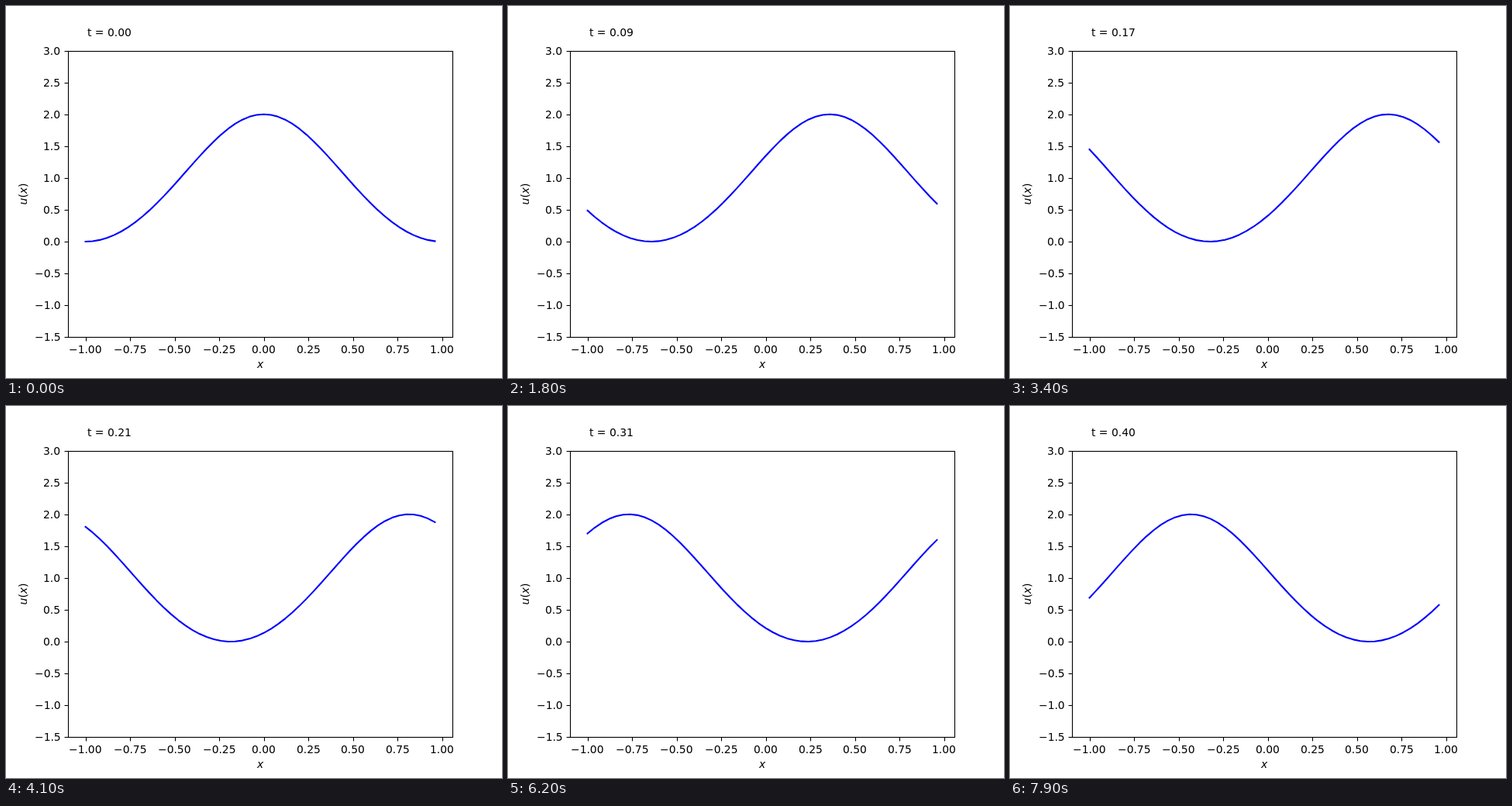
Recreate the animation shown at these times as an HTML page with a canvas. Size 640 by 480 pixels, loop 8000 ms.

```html
<!DOCTYPE html>
<html lang="en">
<head>
<meta charset="utf-8">
<title>Travelling cnoidal wave</title>
<style>
  html, body { margin: 0; width: 100%; height: 100%; overflow: hidden; background: #fff; }
  canvas { display: block; width: 640px; height: 480px; }
</style>
</head>
<body>
<canvas id="stage" width="640" height="480"></canvas>
<script>
const ctx = document.getElementById('stage').getContext('2d');
const FONT = '13.89px "DejaVu Sans", sans-serif';
const OBLIQUE = 'italic ' + FONT;

const LOOP = 8000, STEP = 100;
const DT = 0.00505;      // simulated time per step
const SHIFT = 0.01987;   // crest travel per step
const POINTS = 50, DX = 0.04;
const NOME = 0.0252;

const box = { left: 80, right: 576, top: 57.6, bottom: 427.2 };
const px = x => box.left + (x + 1.098) / 2.156 * (box.right - box.left);
const py = u => box.bottom - (u + 1.5) / 4.5 * (box.bottom - box.top);
const snap = v => Math.floor(v + 0.5) + 0.5;

// Fourier series of cn², scaled to run from 0 to 2 with period 2
function series(x) {
  let sum = 0;
  for (let n = 1; n <= 5; n++) {
    sum += n * NOME ** n / (1 - NOME ** (2 * n)) * Math.cos(n * Math.PI * x);
  }
  return sum;
}
const low = series(1), high = series(0);
const wave = x => 2 * (series(x) - low) / (high - low);

function text(str, x, y, align = 0, font = FONT) {
  ctx.font = font;
  ctx.fillText(str, Math.round(x - align * ctx.measureText(str).width), y);
}

function line(x1, y1, x2, y2) {
  ctx.beginPath();
  ctx.moveTo(x1, y1);
  ctx.lineTo(x2, y2);
  ctx.stroke();
}

const label = (v, digits) => v.toFixed(digits).replace('-', '\u2212');

function drawAxes() {
  ctx.fillStyle = ctx.strokeStyle = '#000';
  ctx.lineWidth = 1.11;
  ctx.lineCap = 'butt';
  ctx.lineJoin = 'miter';
  const l = snap(box.left), r = snap(box.right), t = snap(box.top), b = snap(box.bottom);
  ctx.strokeRect(l, t, r - l, b - t);

  for (let i = -4; i <= 4; i++) {
    const x = px(i / 4);
    line(snap(x), b, snap(x), b + 5);
    text(label(i / 4, 2), x, 448, 0.5);
  }
  for (let i = -3; i <= 6; i++) {
    const y = py(i / 2);
    line(l, snap(y), l - 5, snap(y));
    text(label(i / 2, 1), 70.28, Math.round(y + 5.2), 1);
  }

  text('x', 328, 467, 0.5, OBLIQUE);

  ctx.save();
  ctx.translate(27, 256.4);
  ctx.rotate(-Math.PI / 2);
  let pen = 0;
  for (const [ch, font] of [['u', OBLIQUE], ['(', FONT], ['x', OBLIQUE], [')', FONT]]) {
    ctx.font = font;
    ctx.fillText(ch, pen, 0);
    pen += ctx.measureText(ch).width;
  }
  ctx.restore();
}

function drawWave(step) {
  ctx.strokeStyle = '#00f';
  ctx.lineWidth = 2.083;
  ctx.lineCap = 'square';
  ctx.lineJoin = 'round';
  ctx.beginPath();
  for (let i = 0; i < POINTS; i++) {
    const x = -1 + i * DX;
    ctx.lineTo(px(x), py(wave(x - step * SHIFT)));
  }
  ctx.stroke();
}

function draw(ms) {
  const step = Math.floor((ms % LOOP) / STEP);
  ctx.fillStyle = '#fff';
  ctx.fillRect(0, 0, 640, 480);
  drawAxes();
  drawWave(step);
  text('t = ' + (step * DT).toFixed(2), 104.8, 39);
}

const start = performance.now();
function tick() {
  draw(performance.now() - start);
  requestAnimationFrame(tick);
}
tick();
</script>
</body>
</html>
```
